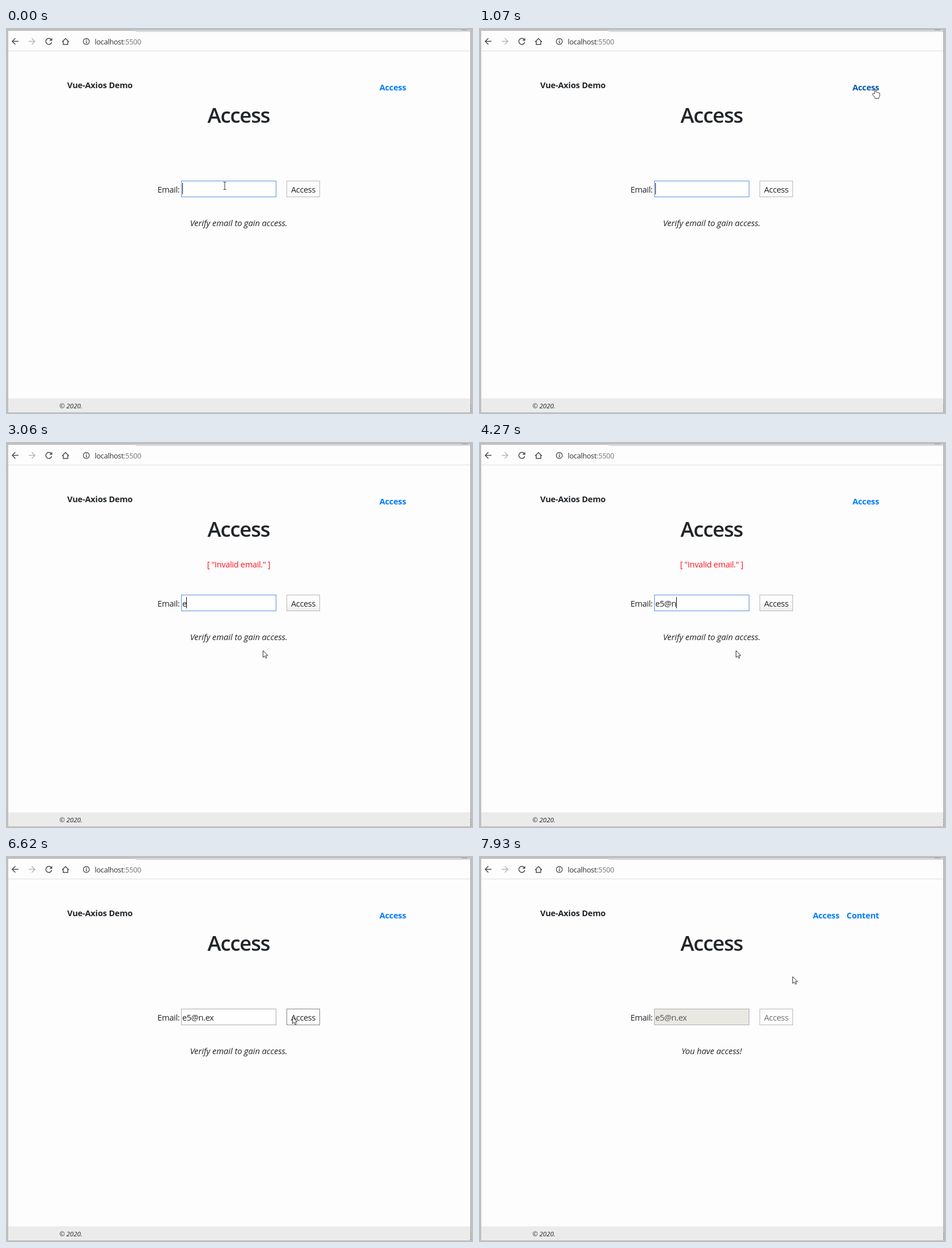
An HTML page that plays this animation: 824x680 px, repeating every 8000 ms.

```html
<!DOCTYPE html>
<html lang="en">
<head>
<meta charset="utf-8">
<title>Vue-Axios Demo</title>
<style>
  html, body { margin: 0; width: 100%; height: 100%; overflow: hidden; background: #c0c0c0; }
  svg { display: block; }
  text { font: 14.6px "Open Sans", "Noto Sans", sans-serif; letter-spacing: -.024em; fill: #212529; white-space: pre; }
  .bold { font-weight: 700; letter-spacing: -.013em; }
  .link { fill: #007bff; }
  .title { font-size: 36.5px; font-weight: 600; letter-spacing: -.032em; }
  .note { font-size: 14.8px; font-style: italic; letter-spacing: -.006em; }
  .small { font-size: 11.6px; font-style: italic; letter-spacing: -.006em; }
  .url { font-size: 12.8px; fill: #333; }
  .status { font-size: 10.85px; fill: #666; }
  .mid { text-anchor: middle; }
  .end { text-anchor: end; }
  .icon { fill: none; stroke: #4a4d51; stroke-width: 1.5; }
</style>
</head>
<body>
<svg width="824" height="680" viewBox="0 0 824 680">
  <defs>
    <linearGradient id="shade" x2="0" y2="1">
      <stop offset=".4" stop-color="#fdfdfd"/>
      <stop offset="1" stop-color="#eee"/>
    </linearGradient>
    <clipPath id="window"><path d="M4 5H819V677H4Z"/></clipPath>
  </defs>

  <rect width="824" height="680" fill="#c0c0c0"/>
  <rect x="4" y="5" width="815" height="672" fill="#fdfdfd"/>
  <path d="M226 4H819V7H232Q228 7 226 4Z" fill="#d9d9e3"/>
  <path d="M804 3.5H814" stroke="#8c8c8c"/>
  <path d="M4 40.5H819" stroke="#dedede"/>
  <rect x="4" y="652.5" width="815" height="24.5" fill="#ebebeb"/>
  <path d="M819.5 5V677" stroke="#b3b3b3"/>
  <path d="M820 664V676" stroke="#8f8f8f" stroke-dasharray="2 3"/>

  <g class="icon">
    <path d="M22 23.5H11.5M16.5 18L11 23.5L16.5 29"/>
    <path d="M40 23.5H50.5M45.5 18L51 23.5L45.5 29" stroke="#b4b6b8"/>
    <path d="M79.7 20.3A5.3 5.3 0 1 0 80.7 25"/>
    <path d="M81.5 17.5V22.5H76.5Z" fill="#4a4d51" stroke="none"/>
    <path d="M99 24.5L105 18.5L111 24.5M101 23V29H109V23"/>
    <circle cx="141.7" cy="23.8" r="5.3" stroke-width="1.3"/>
    <path d="M141.7 23V27M141.7 20.5V22"/>
  </g>
  <text class="url" x="156.5" y="28.5">localhost<tspan fill="#777">:5500</tspan></text>

  <text class="bold" x="108" y="106">Vue-Axios Demo</text>
  <text class="bold link end" id="accessLink" y="110">Access</text>
  <text class="bold link end" id="contentLink" x="706" y="110">Content</text>
  <text class="title mid" x="410.5" y="167">Access</text>
  <text class="mid" id="error" x="410.5" y="220.5" style="fill:#fa1420">[ "Invalid email." ]</text>

  <text x="267.3" y="290">Email:</text>
  <rect id="field" x="309.5" y="269.5" width="167" height="28"/>
  <text id="email" x="311" y="290"></text>
  <path id="caret" stroke="#111" d="M.5 273V293"/>
  <rect id="button" x="495.5" y="269.5" width="58" height="28"/>
  <text class="mid" id="buttonText" x="524.5" y="290">Access</text>
  <text class="note mid" id="note" x="410.5" y="349"></text>
  <text class="small" x="94" y="670">© 2020.</text>

  <g id="status" clip-path="url(#window)">
    <path d="M4 657.5H75Q78 657.5 78 661V677H4Z" fill="#f4f4f4"/>
    <text class="status" x="1.5" y="671.5">localhost:5500</text>
  </g>

  <g id="pointer" stroke-linejoin="round">
    <path id="arrow" d="M.5 .5V12.5L3.3 9.9L5.3 14L7.2 13.1L5.3 9.2H9Z" fill="#fff" stroke="#333"/>
    <path id="beam" d="M-2.5 -6.5H-.7L0 -6L.7 -6.5H2.5M0 -6V6M-2.5 6.5H-.7L0 6L.7 6.5H2.5" fill="none" stroke="#444" stroke-width="1.1"/>
    <path id="hand" d="M-1.2 9V1Q0 -1 1.2 1V6Q2.6 5 3.6 6.5Q5 5.7 6 7.2Q8 6.7 8 9V12Q8 14 6.5 15.5V17H-.5V15.5L-4.5 10.5Q-5.3 8.5 -3.5 8.3Z" fill="#fff" stroke="#333"/>
  </g>
</svg>
<script>
  const LOOP = 8000;
  const $ = id => document.getElementById(id);
  const show = (id, on) => { $(id).style.display = on ? '' : 'none'; };
  const set = (id, attrs) => { for (const k in attrs) $(id).setAttribute(k, attrs[k]); };
  const between = (v, a, b) => v >= a && v < b;
  const inside = ([x, y], x0, y0, x1, y1) => between(x, x0, x1) && between(y, y0, y1);

  const address = 'e5@n.ex';
  const keyTimes = [2920, 3590, 4020, 4180, 4340, 4500, 4660];
  const caretOff = [[460, 960], [1460, 1960], [2460, 2920], [3470, 3590], [5220, 5720], [6220, 8000]];
  const PRESS = 6620, RELEASE = 6770;

  // Pointer moves: first step, last step, number of steps, destination
  const start = [386, 278];
  const moves = [
    [130, 1070, 8, [699, 107]],
    [1350, 1740, 4, [425, 266]],
    [1900, 2320, 4, [453, 367]],
    [5500, 5950, 4, [505, 283]],
    [7290, 7930, 6, [553, 212]]
  ];

  function pointerAt(t) {
    let pos = start;
    for (const [t0, t1, steps, to] of moves) {
      if (t < t0) break;
      const step = Math.floor((t - t0) / (t1 - t0) * (steps - 1) + 1e-6) + 1;
      const u = Math.min(1, step / steps);
      const eased = u * u * (3 - 2 * u);
      pos = pos.map((v, i) => v + (to[i] - v) * eased);
    }
    return pos;
  }

  function drawPointer(pos, granted) {
    const onLink = inside(pos, 660, 94, 707, 116) && !granted;
    const onField = inside(pos, 309, 269, 477, 298);
    set('pointer', { transform: `translate(${pos.map(Math.round)})` });
    show('hand', onLink);
    show('beam', onField);
    show('arrow', !onLink && !onField);
    $('accessLink').style.fill = onLink ? '#0056b3' : '';
  }

  function draw(t) {
    const granted = t >= RELEASE;
    const focused = t < PRESS;
    const pos = pointerAt(t);
    const typed = keyTimes.filter(k => t >= k).length;
    const hover = inside(pos, 495, 269, 554, 298);

    drawPointer(pos, granted);
    set('accessLink', { x: granted ? 636 : 706 });
    show('contentLink', granted);
    show('error', between(t, keyTimes[0], keyTimes[6]));

    $('email').textContent = address.slice(0, typed);
    $('email').style.fill = granted ? '#555' : '';
    set('field', {
      fill: granted ? '#e9e9e2' : '#fefefe',
      stroke: focused ? '#5a8fe0' : '#adadad'
    });
    const caretX = 310.5 + (typed ? $('email').getComputedTextLength() : 0);
    set('caret', { transform: `translate(${Math.round(caretX)})` });
    show('caret', focused && !caretOff.some(([a, b]) => between(t, a, b)));

    set('button', {
      fill: t < 1350 || hover || granted ? '#fdfdfd' : 'url(#shade)',
      stroke: hover && !granted ? '#858585' : '#b8b8b8'
    });
    $('buttonText').style.fill = granted ? '#707070' : '';
    $('note').textContent = granted ? 'You have access!' : 'Verify email to gain access.';

    show('status', between(t, 1350, 1900));
    set('status', { opacity: t < 1610 ? 1 : t < 1740 ? .65 : .3 });
  }

  function tick(now) {
    draw(now % LOOP);
    requestAnimationFrame(tick);
  }
  draw(0);
  requestAnimationFrame(tick);
</script>
</body>
</html>
```
